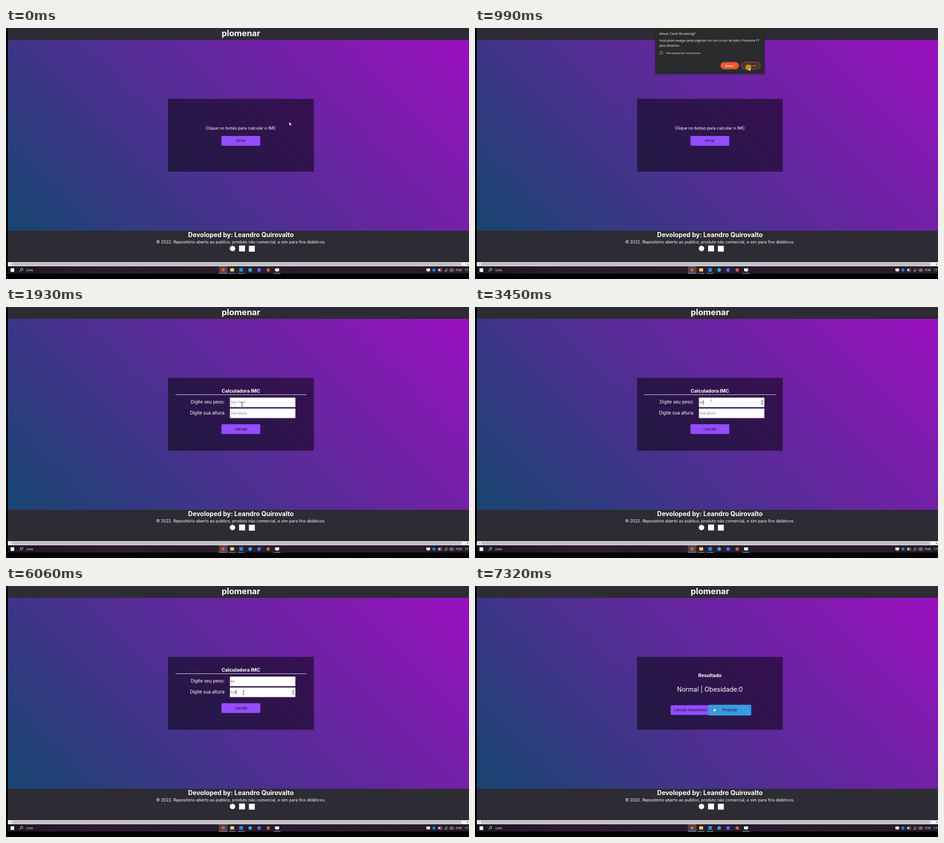
These frames come from a looping animation (1017x551 px, 8000 ms). An HTML page with a canvas:

```html
<!DOCTYPE html>
<html lang="pt-BR">
<head>
<meta charset="utf-8">
<title>Calculadora IMC</title>
<style>
  html, body { margin: 0; width: 100%; height: 100%; overflow: hidden; background: #000; }
  canvas { display: block; }
</style>
</head>
<body>
<canvas id="stage" width="1017" height="551"></canvas>
<script>
const ctx = document.getElementById('stage').getContext('2d');
const LOOP = 8000;
const UI = 'Inter, sans-serif';
const SYSTEM = '"Open Sans", sans-serif';
const PURPLE = '#934dff', BLUE = [55, 156, 228];

// Pointer path: time, x, y
const path = [
  [0, 622, 206], [70, 622, 206], [130, 586, 214], [270, 566, 217], [470, 566, 217],
  [880, 601, 86], [1060, 601, 86], [1250, 548, 214], [1340, 538, 228], [1480, 520, 247],
  [1680, 519, 247], [1930, 518.5, 213.5], [2200, 518.5, 202.5], [4000, 518.5, 202.5],
  [4450, 521.5, 234], [6520, 521.5, 234], [6800, 525, 267], [7320, 525, 266]
];

const ramp = (t, a, b) => Math.min(1, Math.max(0, (t - a) / (b - a)));

function pointerAt(t) {
  const next = path.findIndex(p => p[0] > t);
  if (next < 0) return path[path.length - 1].slice(1);
  const [a, x, y] = path[next - 1], [b, x2, y2] = path[next];
  const k = ramp(t, a, b), e = k * k * (3 - 2 * k);
  return [x + (x2 - x) * e, y + (y2 - y) * e];
}

function rect(x, y, w, h, fill) {
  ctx.fillStyle = fill;
  ctx.fillRect(x, y, w, h);
}

function pill(x, y, w, h, r, fill, stroke) {
  ctx.beginPath();
  ctx.roundRect(x, y, w, h, r);
  if (fill) { ctx.fillStyle = fill; ctx.fill(); }
  if (stroke) { ctx.strokeStyle = stroke; ctx.lineWidth = 0.8; ctx.stroke(); }
}

function disc(x, y, r, fill) {
  ctx.beginPath();
  ctx.arc(x, y, r, 0, 7);
  ctx.fillStyle = fill;
  ctx.fill();
}

function poly(points, fill, stroke) {
  ctx.beginPath();
  points.forEach(([x, y]) => ctx.lineTo(x, y));
  ctx.closePath();
  ctx.fillStyle = fill;
  ctx.fill();
  if (stroke) { ctx.strokeStyle = stroke; ctx.lineWidth = 0.7; ctx.stroke(); }
}

function line(d, color, width = 1) {
  ctx.strokeStyle = color;
  ctx.lineWidth = width;
  ctx.stroke(new Path2D(d));
}

// y is the middle of the capitals
function text(str, x, y, size, { color = '#fff', weight = 400, align = 'center', font = UI } = {}) {
  ctx.font = `${weight} ${size}px ${font}`;
  ctx.textAlign = align;
  ctx.fillStyle = color;
  ctx.fillText(str, x, y + size * 0.35);
}

function gradient(x1, y1, x2, y2, ...colors) {
  const g = ctx.createLinearGradient(x1, y1, x2, y2);
  colors.forEach((c, i) => g.addColorStop(i / (colors.length - 1), c));
  return g;
}

function page() {
  rect(0, 0, 1017, 551, '#000');
  rect(4, 0, 1013, 514, '#2d2b33');
  // 45 degree gradient on the 1024 x 419 content area
  const cx = 516, cy = 235.5, half = (1024 + 419) / 4;
  rect(4, 26, 1013, 419, gradient(cx - half, cy + half, cx + half, cy - half, '#174570', '#9c10c0'));
  rect(356, 155.5, 320, 160, 'rgba(0,0,0,.5)');
  text('plomenar', 516, 12, 18.3, { weight: 700 });
  text('Devoloped by: Leandro Quirovalto', 516, 454.3, 14, { weight: 700 });
  text('© 2022. Repositório aberto ao publico, produto não comercial, e sim para fins didáticos.',
    516, 470, 8.95);
  disc(497.5, 484, 6, '#fff');
  rect(512, 477.5, 13, 13, '#fff');
  rect(533.5, 478, 13, 13, '#fff');
}

function taskbar() {
  rect(4, 514, 1013, 9, '#f1f1f1');
  rect(13, 515, 987, 7, '#c1c1c1');
  poly([[8, 518.5], [10.5, 516.5], [10.5, 520.5]], '#a3a3a3');
  poly([[1015.5, 518.5], [1013, 516.5], [1013, 520.5]], '#505050');
  rect(4, 523, 1013, 16, gradient(4, 0, 1017, 0, '#1c1623', '#301a30', '#2a1c2d', '#281b2c', '#2a1d2c', '#251b28'));

  rect(10, 527.5, 8, 8, '#fff');
  ctx.beginPath();
  ctx.arc(34.5, 530, 2.6, 0, 7);
  ctx.strokeStyle = '#fff';
  ctx.lineWidth = 0.9;
  ctx.stroke();
  line('M32.6 532 L29.5 535.2', '#fff', 0.9);
  text('Links', 44.5, 531.3, 6.3, { align: 'left', font: SYSTEM });

  rect(467.5, 523, 19, 16, '#50434f');
  disc(477, 531, 3.6, '#f15a2b');
  rect(492.5, 527.5, 8.5, 7, '#f6cf60');
  rect(512.5, 527, 8, 8, '#2489d8');
  disc(536.3, 531.2, 4, '#2ca5e0');
  disc(556, 531.2, 4, '#5865f2');
  disc(576, 531.2, 3.7, '#d9564a');
  rect(591, 527.8, 9, 6, '#fff');
  rect(594, 534, 3, 1.2, '#ddd');
  [[467.5, 19], [489.5, 15], [509, 15], [588, 15]].forEach(([x, w]) => rect(x, 538, w, 1.2, '#76b9ed'));

  rect(923.5, 528, 8, 5.6, '#fff');
  rect(926, 534, 3, 1, '#ddd');
  disc(940, 531.3, 3.4, '#1686dd');
  pill(949.5, 529, 7, 4.6, 0.5, null, '#fff');
  rect(950.5, 530, 3, 2.6, '#fff');
  line('M963.5 535 A6 6 0 0 1 969.5 528.5 M965.5 535 A4 4 0 0 1 969.5 531 M967.5 535 A2 2 0 0 1 969.5 533', '#ddd', 0.8);
  line('M974.5 530 H976 L978.5 528 V535 L976 533 H974.5 Z M980 529.5 Q981.4 531.5 980 533.5 M981.5 528 Q983.8 531.5 981.5 535', '#fff', 0.7);
  text('POR', 994.5, 531.3, 6.6, { font: SYSTEM });
  text('17:08', 1007.5, 531.3, 6.6, { align: 'left', font: SYSTEM });
}

function button(label, x, y, hover = 0) {
  const mix = [147, 77, 255].map((c, i) => Math.round(c + (BLUE[i] - c) * hover));
  ctx.save();
  ctx.translate(x, y);
  ctx.scale(1 + hover * 0.1, 1 + hover * 0.1);
  pill(-42.7, -10.7, 85.4, 21.4, 2.2, hover ? `rgb(${mix})` : PURPLE);
  text(label, 0, 0, 7.6, { color: '#140c22' });
  ctx.restore();
}

function field(y, placeholder, value, focused, caretOn) {
  pill(492, y, 143.5, 20.8, 0.5, '#fff', '#b9b3bd');
  const mid = y + 10.4;
  if (value) text(value, 493.2, mid, 6.6, { color: '#4a4a50', align: 'left' });
  else text(placeholder, 493.2, mid, 7.4, { color: '#85858a', align: 'left' });
  if (!focused) return;
  ctx.font = `6.6px ${UI}`;
  if (caretOn) rect(493.3 + ctx.measureText(value).width, mid - 5.2, 0.8, 10.4, '#111');
  rect(627.5, mid - 6.5, 6.5, 13, '#ededed');
  poly([[628.8, mid - 1.9], [630.8, mid - 4.3], [632.8, mid - 1.9]], '#444');
  poly([[628.8, mid + 1.9], [630.8, mid + 4.3], [632.8, mid + 1.9]], '#444');
}

function startScreen(t) {
  text('Clique no botão para calcular o IMC', 516, 219.8, 9.1);
  button('Iniciar', 515.9, 247.8, ramp(t, 1400, 1550));
}

function formScreen(t) {
  const weight = t < 3260 ? '' : t < 3450 ? '6' : '64';
  const typed = [5530, 5670, 5860, 6060].filter(k => t >= k).length;
  const onWeight = t >= 2130 && t < 4450, onHeight = t >= 4450;
  text('Calculadora IMC', 516, 184.7, 10.5, { weight: 700 });
  rect(372, 192, 288, 1, '#e8e4ea');
  text('Digite seu peso:', 443, 208.7, 9.8);
  text('Digite sua altura:', 443, 232.4, 9.8);
  field(199, 'Seu Peso', weight, onWeight, t < 2660 || t >= 3190);
  field(223, 'Sua altura', '1,74'.slice(0, typed), onHeight, t < 4990 || t >= 5530);
  button('Calcular', 515.9, 268, ramp(t, 6680, 6830));
}

function resultScreen(t) {
  text('Resultado', 516, 196.4, 10.5, { weight: 700 });
  text('Normal | Obesidade:0', 516, 227, 14);
  button('Calcular Novamente', 472.4, 272.4);
  button('Finalizar', 559.7, 272.4, ramp(t, 6980, 7180));
}

function dialog(t) {
  const alpha = ramp(t, 50, 160) * (1 - ramp(t, 1060, 1190));
  if (!alpha) return;
  const hover = t > 850;
  const left = { align: 'left', font: SYSTEM };
  const scale = 0.94 + 0.06 * alpha;
  ctx.save();
  ctx.globalAlpha = alpha;
  ctx.translate(516, 0);
  ctx.scale(scale, scale);
  ctx.translate(-516, 0);
  ctx.shadowColor = 'rgba(0,0,0,.5)';
  ctx.shadowBlur = 3;
  rect(396, -2, 240, 102.5, '#292b2c');
  ctx.shadowBlur = 0;
  text('Ativar Caret Browsing?', 405, 12.2, 7.6, left);
  text('Você pode navegar pelas páginas com um cursor de texto. Pressione F7', 405, 27.7, 6.6, left);
  text('para desativar.', 405, 38.3, 6.6, left);
  pill(406.5, 51.7, 5.6, 5.6, 0.5, null, '#c8c8c8');
  text('Não perguntar novamente', 420, 54.5, 6.1, left);
  pill(538.8, 74.3, 41.4, 16.6, 8.3, '#6b5a58');
  pill(540, 75.5, 39, 14.2, 7.1, '#fb542b');
  text('Ativar', 559, 82.8, 6, { weight: 700, font: SYSTEM });
  pill(585, 74.6, 41.6, 16, 8, hover ? '#4d322d' : null, hover ? '#e0604a' : '#d8d8d8');
  text('Cancelar', 605.7, 82.8, 5.9, { weight: 600, font: SYSTEM, color: hover ? '#f0634a' : '#fff' });
  ctx.restore();
}

function arrow(x, y, fill, stroke) {
  const shape = [[0, 0], [0, 8.2], [1.9, 6.5], [3.2, 9.6], [4.6, 9], [3.3, 6], [5.8, 6]];
  poly(shape.map(([dx, dy]) => [x + dx, y + dy]), fill, stroke);
}

function hand(x, y) {
  const shape = new Path2D('M-1 0 Q0 -1.5 1 0 V3.4 L4.4 4.3 Q5.2 4.8 5 6 L4.2 9.8 H-1 L-3.8 6 Q-3.4 4.7 -2 5.6 L-1 6.6 Z');
  ctx.save();
  ctx.translate(x, y);
  ctx.fillStyle = '#fff';
  ctx.fill(shape);
  ctx.strokeStyle = '#1b1b22';
  ctx.lineWidth = 0.7;
  ctx.stroke(shape);
  ctx.restore();
}

function pointer(t) {
  const [x, y] = pointerAt(t);
  if (t > 930 && t < 1060) disc(x - 0.5, y + 0.5, 6.2, 'rgba(205,175,15,.88)');
  const overStart = t >= 1390 && t < 1740;
  if (overStart || t >= 6670) hand(x, y);
  else if (t >= 1800) line(`M${x - 2} ${y - 4} h4 M${x} ${y - 4} v8 M${x - 2} ${y + 4} h4`, y < 204 ? '#77727c' : '#444', 0.9);
  else arrow(x, y, '#fff', '#26222c');
}

function draw(t) {
  page();
  taskbar();
  (t < 1600 ? startScreen : t < 6950 ? formScreen : resultScreen)(t);
  // the recorder leaves a faint trace of the first pointer
  if (t >= 70 && t < 1340) arrow(622, 206, '#28202f');
  dialog(t);
  pointer(t);
}

function tick() {
  draw(performance.now() % LOOP);
  requestAnimationFrame(tick);
}
tick();
</script>
</body>
</html>
```
